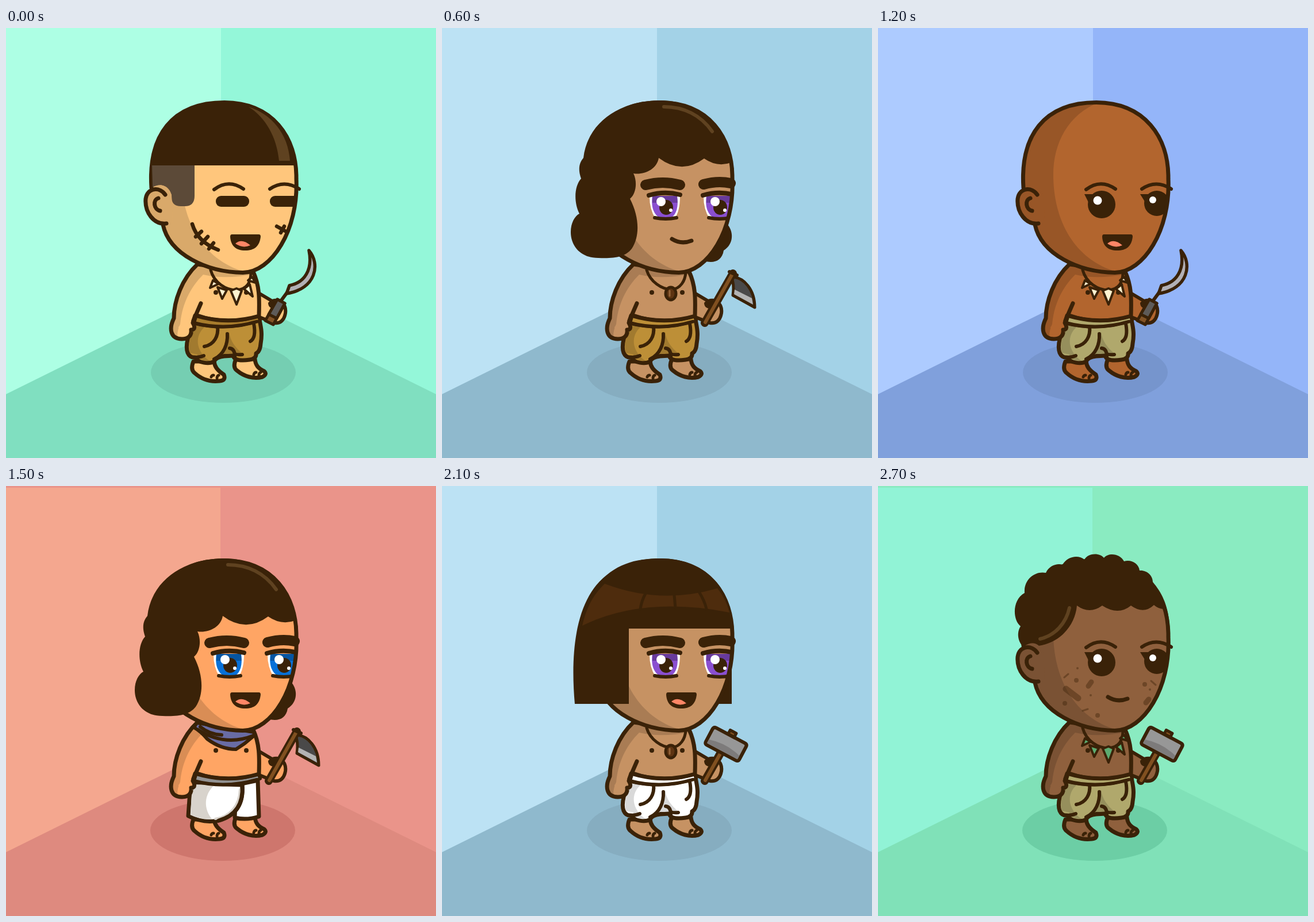
Write an HTML page that moves like this. It is 748 px wide and 748 px high and loops after 3 s.

```html
<!DOCTYPE html>
<html lang="en">
<head>
<meta charset="utf-8">
<title>Little workers</title>
<style>
  html, body { margin: 0; width: 100%; height: 100%; overflow: hidden; }
  svg { display: block; width: 100%; height: 100%; stroke-linecap: round; stroke-linejoin: round; }
</style>
</head>
<body>
<svg id="stage" viewBox="0 0 748 748"></svg>
<script>
const INK = '#3a2208', SHINE = '#5f4220', SHADE = 'rgba(0,0,0,.15)';
const HEAD = 'M253 278C247 188 288 129.500 380 129.500C464 130 506 190 505 262C509 352 462 425 412 425.500C350 425 284 394 273 342L253 278Z';
const TORSO = 'M333 411C306 436 292 475 292 505C283 523 286 541 306 541C320 541 323 532 322 525C331 525 327 516 325 513L329 500Q385 517 440 501C441 470 441 448 430 424Z';
const EAR = 'M254 279Q276 264 288 290L290 340H279C257 343 241 320 243 297Q245 284 254 279Z';

const fill = (d, c = INK) => `<path d="${d}" fill="${c}"/>`;
const line = (d, w = 7, c = INK) => `<path d="${d}" fill="none" stroke="${c}" stroke-width="${w}"/>`;
const shape = (d, c, w = 7) => `<path d="${d}" fill="${c}" stroke="${INK}" stroke-width="${w}"/>`;
const oval = (x, y, rx, ry = rx, c = INK) => `<ellipse cx="${x}" cy="${y}" rx="${rx}" ry="${ry}" fill="${c}"/>`;
const box = (x, y, w, h, r, c = INK) => `<rect x="${x}" y="${y}" width="${w}" height="${h}" rx="${r}" fill="${c}"/>`;
const clip = (id, s) => `<g clip-path="url(#${id})">${s}</g>`;
const move = (x, y, s) => `<g transform="translate(${x} ${y})">${s}</g>`;

function room({ room: [left, right, floor, shadow], inset }) {
  const wall = !left
    ? box(0, 0, 748, 748, 0, right) + box(0, 444, 748, 304, 0, floor)
    : box(0, 0, 748, 748, 0, right)
      + fill(inset ? 'M0 3H373V460L0 640Z' : 'M0 0H374V460L0 640Z', left)
      + fill('M0 637L374 452L748 637V748H0Z', floor);
  return wall + oval(inset || !left ? 377 : 378, 599, 126, 53, shadow);
}

const tools = {
  sickle: () => line('M478 475L489 460', 6)
    + shape('M488 462L493 448C519 443 534 421 527 387C547 410 540 454 488 462Z', '#b2b0b5', 5.5)
    + shape('M472 472L485 479L465 516L451 509Z', '#825325', 5)
    + shape('M472 472L485 479L471 505L457 498Z', '#5e5b58', 5),
  hammer: () => line('M457 513L486 462', 14) + line('M458 512L486 462', 6, '#815020')
    + `<g transform="translate(494 449) rotate(28)">${shape('M-5 -17V-25H7V-17Z', '#815020', 5)}`
    + shape('M-28 -17H28Q33 -17 33 -12V12Q33 17 28 17H-28Q-33 17 -33 12V-12Q-33 -17 -28 -17Z', '#979797', 6)
    + fill('M-30 7Q0 -2 30 7V14H-30Z', '#7d7b7b') + '</g>',
  axe: () => shape('M503 433C526 433 544 456 544 486L506 465Q509 445 503 433Z', '#4a4949', 5)
    + fill('M509 455L539 470L541 481L508 463Z', '#b3b3b3')
    + line('M457 513L506 427', 14) + line('M458 512L505 428', 6, '#815020')
    + line('M500 424L513 430', 6),
  pot: () => shape('M478 427L518 435L505 461C522 483 515 507 502 522C485 534 460 520 458 502C454 483 468 468 481 460Z', '#946439', 6)
    + fill('M481 465C461 473 455 498 467 514Q478 525 488 524C471 508 470 487 489 466Z', SHADE)
    + line('M482 459L505 464', 7)
};

const necks = {
  teeth: c => line('M356 421C362 443 382 456 401 456C420 454 426 442 426 425', 5)
    + ['M391 457L401 453L410 457L401 481Z', 'M368 451L384 456L376 471Z', 'M360 439L370 445L355 452Z',
       'M414 454L424 446L429 467Z', 'M421 439L428 433L434 443Z'].map(d => shape(d, c, 4)).join(''),
  scarf: c => shape('M332 412L327 420Q339 427 350 440Q374 458 400 458L415 448L433 433L430 428Z', c, 6)
    + line('M338 419Q354 432 375 433', 6) + line('M334 424Q381 454 431 434', 6),
  pendant: () => line('M356 421C362 441 382 455 400 455C415 453 423 440 424 425', 5)
    + `<ellipse cx="398" cy="462" rx="9" ry="11" fill="#5e3412" stroke="${INK}" stroke-width="5"/>`
    + line('M396 457V466', 3, '#946439')
};

function trousers({ pants, band, shorts }) {
  const belt = shape('M331 499Q385 518 440 501L442 509Q384 528 327 513Z', band || pants, 6);
  if (shorts) return shape('M400 520L438 512L440 575Q418 582 398 577Z', pants)
    + shape('M321 517L317 574Q342 587 370 582C404 572 413 547 411 520Z', pants)
    + fill('M324 519L321 572Q339 580 359 580C343 562 344 536 363 520Z', '#d8d3cc')
    + line('M407 528C406 556 389 576 364 579', 4, '#d8d3cc') + line('M411 521C413 550 402 573 370 582') + belt;
  return shape('M327 513C318 530 311 552 316 565Q320 574 329 573C334 583 354 585 362 580Q365 573 379 571L395 570Q398 581 424 577Q436 575 435 566Q442 563 443 549C446 533 444 522 441 508Q385 527 327 513Z', pants)
    + fill('M330 517C320 535 316 552 320 565L333 568C336 577 345 579 354 579C329 562 328 534 346 520Z', SHADE)
    + fill('M388 528C390 545 399 556 412 567L374 569Q386 552 388 528Z', SHADE)
    + line('M368 519C370 536 362 551 345 554', 6) + line('M385 532C386 550 379 568 362 576', 6)
    + line('M431 514C434 530 432 541 425 545', 6) + line('M389 557Q398 558 398 571M398 567Q404 569 411 568', 6)
    + line('M329 573Q337 573 344 570', 6) + line('M380 570H396', 6) + belt;
}

const foot = (outline, skin, toes) => shape(outline, skin) + line(toes, 5);
const dust = (big, lines, dots) => `<g opacity=".4">${line(big[0], 11)}${line(big[1], 9)}${line(lines, 3)}${
  dots.map(([x, y, r]) => oval(x, y, r)).join('')}</g>`;

function body(p) {
  const stitches = line('M319 437L334 450M331 436L322 452M311 471L319 498M306 482L320 476M309 491L323 487', 5.5);
  const dirt = dust(['', 'M319 463L327 461'],
    'M329 439L337 443M310 478L317 472M305 497L313 493M318 497L322 492M351 474L360 479M348 490L354 485M306 460L308 466',
    [[323, 448, 3], [341, 458, 4], [312, 485, 2], [326, 477, 3], [347, 470, 2], [356, 490, 2], [334, 469, 2]]);
  return foot('M326 580C322 590 323 596 328 600C340 611 355 616 372 614Q383 613 379 603C367 595 363 589 362 580Z', p.skin,
      'M357 607Q358 604 361 604M367 609Q367 605 370 604')
    + foot('M400 576C396 585 396 592 402 596C414 606 430 611 446 607Q455 602 449 597C438 592 434 586 433 576Z', p.skin,
      'M431 603Q432 599 435 599M440 604Q440 600 443 599')
    + shape('M436 459L463 475C478 470 488 482 486 496C484 508 477 515 466 513L436 501Z', p.skin, 6)
    + fill('M456 478Q462 471 472 474L467 488Q456 488 456 478Z')
    + tools[p.tool]()
    + fill(TORSO, p.skin)
    + clip('torso', fill('M333 405L432 428Q380 438 343 429C317 455 306 485 303 515Q296 530 299 545H280L285 480Z', SHADE))
    + (p.arm == 'stitches' ? stitches : p.arm == 'dirt' ? dirt : '')
    + oval(365, 460, 4) + oval(418, 460, 4)
    + trousers(p)
    + fill('M331 498L325 513C328 520 330 526 322 526Q322 541 306 541L300 520Z', p.skin)
    + line(TORSO) + line('M339 479L326 509')
    + necks[p.neck[0]](p.neck[1]);
}

const hair = {
  buzz: () => clip('head', box(240, 120, 280, 119, 0))
    + fill('M422 137C462 150 491 184 494 231H475C471 190 452 156 422 137Z', SHINE)
    + fill('M254 239H328V292Q328 310 311 310H304Q288 310 288 294C288 279 272 267 255 277Z', '#5c4a38'),
  curly: () => fill('M252 279C243 270 241 255 248 244C234 233 233 198 255 186C253 163 273 147 292 151C298 138 312 134 321 137C329 122 349 119 359 128C366 116 386 116 393 125C402 115 421 118 428 131C440 127 454 135 455 147C468 146 478 156 478 167C493 185 504 205 507 240L497 214Q488 214 480 207Q462 224 440 208Q418 226 390 208Q368 224 346 208C343 242 318 270 285 277Q268 281 252 279Z')
    + line('M333 212C327 239 308 260 282 266', 6, SHINE),
  wavy: () => fill('M246 226C253 165 308 126 380 126C460 127 504 188 508 250L503 234Q479 243 456 227Q417 256 377 226C374 246 351 256 333 253C340 267 338 288 327 297C344 330 344 363 330 384C318 399 300 401 272 400C240 400 224 378 224 355C224 339 231 327 239 323C229 303 230 275 242 262C236 245 239 234 246 226Z')
    + line('M386 137C420 137 450 151 470 180', 6, SHINE),
  bob: () => fill('M231 379C224 300 230 220 268 173C300 136 335 126 380 126C455 126 504 175 507 248H325V379Z')
    + fill('M283 170Q380 207 479 178Q494 196 500 220Q351 191 244 243C250 215 262 190 283 170Z', '#4e2c0d')
    + line('M354 187Q347 200 345 214M404 190L406 212M447 184Q457 200 460 214', 5),
  bald: () => ''
};
const backHair = {
  wavy: () => fill('M495 340C508 353 508 376 490 387C487 406 472 410 455 405Z'),
  bob: () => box(440, 250, 64, 129, 0)
};

const animeEye = c => fill('M361 293H414Q414 318 405 331H371Q361 315 361 293Z', '#fff')
  + fill('M366 292H409C412 312 407 324 400 329H377C369 324 363 312 366 292Z', c)
  + fill('M366 292H409L410 304H366Z', 'rgba(0,0,0,.25)')
  + oval(390, 312, 12, 13) + oval(381, 302, 8, 8, '#fff') + oval(398, 317, 3, 3, '#fff')
  + line('M360 291Q387 283 414 290', 8) + line('M370 330Q389 334 408 330', 6);
const eyes = {
  shut: () => box(365, 292, 58, 19, 9) + box(459, 292, 60, 19, 9),
  tall: () => [0, 84].map(x => move(x, 0, fill('M377 282H411V312Q411 329 394 329Q377 329 377 312Z') + box(381, 291, 8, 20, 3, '#fff'))).join(''),
  sleepy: () => fill('M365 294H413C416 315 402 327 389 327C374 327 364 315 365 294Z')
    + fill('M464 294H510V318Q500 323 488 323Q464 321 464 294Z')
    + oval(382, 303, 8, 8, '#fff') + oval(478, 302, 6, 6, '#fff')
    + line('M360 297H410M467 297H505', 6),
  round: () => oval(389, 307, 24) + fill('M359 289H395L368 307Z') + oval(382, 300, 7.5, 7.5, '#fff')
    + oval(485, 305, 22) + fill('M456 289H495L466 305Z') + oval(478, 299, 6, 6, '#fff'),
  anime: c => animeEye(c) + move(94, 0, animeEye(c))
};
const brows = {
  thin: () => line('M362 281Q387 262 413 280M459 280Q484 263 510 280', 6),
  angry: () => line('M363 275L412 281M457 280L506 276', 17),
  flat: () => line('M363 278H411M458 278H506', 18),
  thick: () => line('M354 273Q384 265 414 273', 18) + line('M455 272Q480 265 502 270', 18)
};
const mouths = {
  laugh: () => fill('M393 359H440Q443 359 443 363C441 380 432 387 416 387C400 387 391 379 390 363Q390 359 393 359Z')
    + fill('M399 375Q410 365 425 378Q412 384 399 375Z', '#ff8666'),
  stern: () => line('M396 371H432M407 385H422'),
  teeth: () => box(379, 356, 77, 35, 17) + box(387, 363, 61, 21, 7, '#fff')
    + line('M387 373.5H448', 7) + line('M397 363V384M416 363V384M436 363V384', 5),
  smile: () => line('M400 367Q416 377 434 370')
};
const marks = {
  stitches: () => line('M324 341Q333 372 369 386M330 363L340 354M340 375L351 363M353 384L361 374M471 345L489 355M484 345L478 356', 6.5),
  dirt: () => dust(['M327 353L348 369', 'M366 348L371 341M466 377L471 371'],
    'M324 333L331 327M356 391L365 388M475 339L483 346',
    [[347, 317, 2], [345, 338, 4], [325, 378, 4], [370, 364, 2], [382, 399, 4], [464, 345, 4], [473, 354, 2]])
};

function head(p) {
  const longHair = p.hair in backHair;
  return (longHair ? backHair[p.hair]() : '')
    + fill(HEAD, p.skin)
    + clip('head', fill('M385 129C331 150 305 200 305 255C305 335 342 403 415 424L380 440H230V110H385Z', SHADE)
      + (p.marks ? marks[p.marks]() : '')
      + eyes[p.eyes[0]](p.eyes[1])
      + (p.beard ? fill('M394 428C402 407 415 400 428 400Q444 402 456 411L430 430Z') : ''))
    + mouths[p.mouth]()
    + line(HEAD) + hair[p.hair]()
    + (longHair ? '' : fill(EAR, p.skin) + fill(EAR, SHADE)
      + line('M277 290C268 276 246 277 243 297C241 320 257 343 279 340')
      + line('M265 296C255 299 257 316 268 318'))
    + brows[p.brows]();
}

const GREY = ['#d8d8d8', '#c5c5c5', '#b0b0b0', '#a3a3a3'], MINT = ['#adffe4', '#94f7d9', '#80dfc0', '#75ceb2'];
const BLUE = ['#adcbff', '#94b5f9', '#80a0dc', '#7695cd'], SKY = ['#bce2f4', '#a3d2e7', '#8fb9cd', '#86adc0'];
const SAND = [null, '#e8ca9b', '#dfb87e', '#cfa968'], ROSE = ['#f4a78f', '#ea948a', '#de8a7f', '#ce766d'];
const JADE = ['#91f3d6', '#8aebc1', '#80e1b8', '#6ccea5'];

const cast = [
  { room: MINT, skin: '#ffc67c', hair: 'buzz', eyes: ['shut'], brows: 'thin', mouth: 'laugh', marks: 'stitches',
    neck: ['teeth', '#fff3d0'], pants: '#bd8f37', band: '#a87c2c', tool: 'sickle' },
  { room: GREY, skin: '#b2652e', hair: 'curly', eyes: ['tall'], brows: 'angry', mouth: 'stern', marks: 'stitches', beard: true,
    arm: 'stitches', neck: ['teeth', '#fff9c4'], pants: '#555a30', tool: 'hammer' },
  { room: SKY, skin: '#c69263', hair: 'wavy', eyes: ['anime', '#8a4fd0'], brows: 'thick', mouth: 'smile',
    neck: ['pendant'], pants: '#bd8f37', tool: 'axe' },
  { room: SAND, skin: '#c69263', hair: 'buzz', eyes: ['sleepy'], brows: 'flat', mouth: 'teeth', marks: 'dirt',
    arm: 'stitches', neck: ['scarf', '#43865e'], pants: '#746a5d', tool: 'pot' },
  { room: BLUE, skin: '#b2652e', hair: 'bald', eyes: ['round'], brows: 'thin', mouth: 'laugh',
    neck: ['teeth', '#fff3d0'], pants: '#b0a86c', tool: 'sickle' },
  { room: ROSE, inset: true, skin: '#ffa564', hair: 'wavy', eyes: ['anime', '#0871d8'], brows: 'thick', mouth: 'laugh',
    neck: ['scarf', '#696ca4'], pants: '#fff', band: '#929292', shorts: true, tool: 'axe' },
  { room: BLUE, skin: '#ffc67c', hair: 'bald', eyes: ['anime', '#7b4b2e'], brows: 'thick', mouth: 'smile',
    arm: 'dirt', neck: ['scarf', '#ad35b9'], pants: '#555a2f', tool: 'sickle' },
  { room: SKY, skin: '#c69263', hair: 'bob', eyes: ['anime', '#8a4fd0'], brows: 'thick', mouth: 'laugh',
    neck: ['pendant'], pants: '#fff', tool: 'hammer' },
  { room: GREY, skin: '#ffa564', hair: 'curly', eyes: ['tall'], brows: 'flat', mouth: 'smile',
    neck: ['scarf', '#43865e'], pants: '#746a5d', tool: 'pot' },
  { room: JADE, inset: true, skin: '#8f603d', hair: 'curly', eyes: ['round'], brows: 'thin', mouth: 'smile', marks: 'dirt',
    neck: ['teeth', '#5cab70'], pants: '#b0a86c', tool: 'hammer' }
];

const stage = document.getElementById('stage');
stage.innerHTML = `<defs><clipPath id="head"><path d="${HEAD}"/></clipPath><clipPath id="torso"><path d="${TORSO}"/></clipPath></defs>`
  + cast.map(p => `<g class="scene" display="none">${room(p)}${body(p)}${head(p)}</g>`).join('');
const scenes = [...stage.querySelectorAll('.scene')];
const start = performance.now();

function tick(now) {
  const current = Math.floor(Math.max(0, now - start) / 300) % scenes.length;
  scenes.forEach((g, i) => g.setAttribute('display', i == current ? 'inline' : 'none'));
  requestAnimationFrame(tick);
}
tick(start);
</script>
</body>
</html>
```
